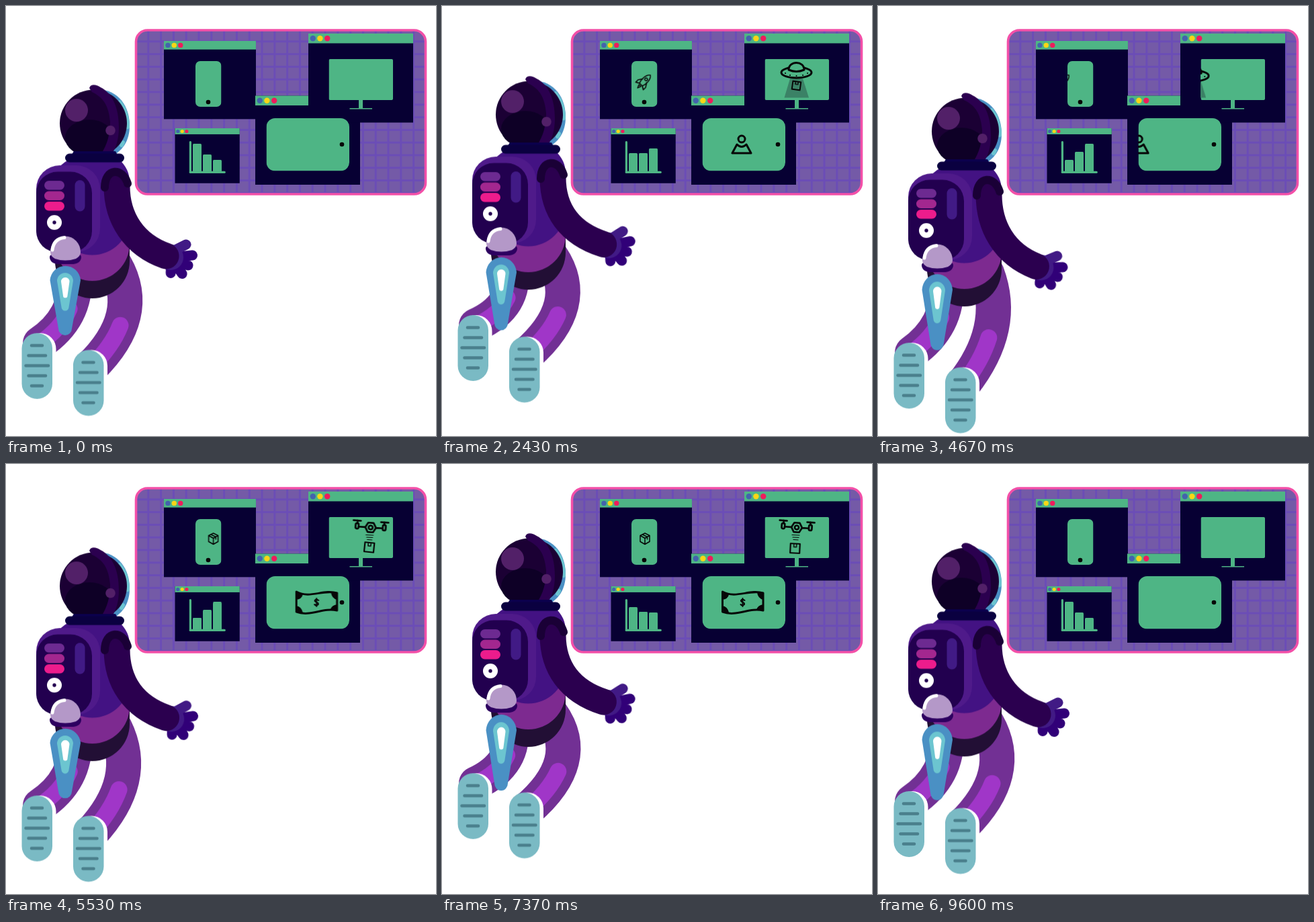
An HTML page without scripts for the animation above (9.63 s loop, 640 px wide and 640 px high).

```html
<!DOCTYPE html>
<html lang="en">
<head>
<meta charset="utf-8">
<title>Astronaut at a floating screen</title>
<style>
html, body { margin: 0; height: 100%; overflow: hidden; background: #fff; }
svg { display: block; width: 100vw; height: 100vh; }
.line { fill: none; stroke: #070707; stroke-width: 3; stroke-linecap: round; stroke-linejoin: round; }
.thin { stroke-width: 1.5; }
.green { fill: #4eb585; }

/* Floating figure: every part starts at its resting extreme */
.body, .rleg, .lleg, .rfoot, .lfoot, .arm, .hand {
  animation: 9.63s cubic-bezier(.37,0,.63,1) -.23s infinite;
}
.body { animation-name: float; }
.rleg { animation-name: rleg; }
.lleg { animation-name: lleg; }
.rfoot { animation-name: rfoot; }
.lfoot { animation-name: lfoot; }
.arm { animation-name: arm; }
.hand { animation-name: hand; transform-origin: 200px 340px; }
@keyframes float {
  0%, 100% { transform: translateY(.5px); }
  24.7% { transform: translateY(-13.5px); }
  52.2% { transform: translateY(12.3px); }
  78.2% { transform: translateY(-14px); }
}
@keyframes rfoot {
  0%, 100% { transform: translateY(.5px); }
  23.2% { transform: translateY(-8px); }
  50.2% { transform: translateY(14.2px); }
  73% { transform: translateY(-9.8px); }
}
@keyframes rleg {
  0%, 100% { d: path("M162 385Q205 460 126 538"); }
  23.2% { d: path("M162 385Q212 456 126 530"); }
  50.2% { d: path("M162 385Q193 467 126 552"); }
  73% { d: path("M162 385Q213 455 126 528"); }
}
@keyframes lfoot {
  0%, 100% { transform: translateY(0); }
  23.2% { transform: translateY(-15px); }
  54% { transform: translateY(2.5px); }
  74% { transform: translateY(-14px); }
}
@keyframes lleg {
  0%, 100% { d: path("M103 400Q106 464 50 502"); }
  23.2% { d: path("M103 400Q114 459 50 487"); }
  54% { d: path("M103 400Q105 465 50 504"); }
  74% { d: path("M103 400Q113 460 50 488"); }
}
@keyframes arm {
  0%, 100% { d: path("M165 268C165 315 190 355 238 372"); }
  24.2% { d: path("M165 268C165 317 190 351 241 367"); }
  47% { d: path("M165 268C165 315 187 357 235 376"); }
  69.9% { d: path("M165 268C165 317 190 351 241 367"); }
}
@keyframes hand {
  0%, 100% { transform: rotate(0); }
  24.2% { transform: rotate(-6.5deg); }
  47% { transform: rotate(5deg); }
  69.9% { transform: rotate(-7deg); }
}
.flame { transform-origin: 88px 385px; animation: flame 9.63s ease-in-out infinite; }
@keyframes flame {
  0%, 16%, 42%, 56%, 87.5%, 100% { transform: scaleY(1); }
  8%, 30%, 48.5%, 76%, 99.7% { transform: scaleY(1.096); }
  25.2% { transform: scaleY(1.05); }
  35.6%, 65% { transform: scaleY(1.06); }
}

/* Screen icons: two sets take turns, half a loop apart */
.slide { --k: 1; animation: slide 9.63s linear infinite; }
.second { animation-delay: -4.815s; }
.small { --k: .45; }
@keyframes slide {
  0% { transform: translateX(calc(var(--k) * 100px)); animation-timing-function: ease-out; }
  9.5% { transform: translateX(calc(var(--k) * 8px)); }
  15% { transform: translateX(calc(var(--k) * 6px)); animation-timing-function: ease-out; }
  24%, 36% { transform: translateX(0); animation-timing-function: ease-in-out; }
  43.2% { transform: translateX(calc(var(--k) * 17px)); animation-timing-function: cubic-bezier(.55,0,1,.85); }
  49.5%, 100% { transform: translateX(calc(var(--k) * -100px)); }
}
.sink { animation: sink 9.63s ease-in-out infinite; }
@keyframes sink {
  0%, 25.2% { transform: translateY(0); }
  35.6% { transform: translateY(3px); }
  48%, 100% { transform: translateY(5px); }
}
.lift { animation: lift 9.63s ease-in-out infinite; }
@keyframes lift {
  0%, 25.2% { transform: translate(527.5px, 118.5px) rotate(8deg); }
  35.6%, 100% { transform: translate(527px, 119.5px) rotate(0); }
}
.drop { animation: drop 9.63s ease-in-out infinite; }
@keyframes drop {
  0%, 65% { transform: translate(526px, 124px) rotate(6deg); }
  87.5%, 100% { transform: translate(525px, 127px) rotate(0); }
}

.bar { animation: 9.63s cubic-bezier(.7,0,.25,1) infinite; }
.b1 { animation-name: b1; }
.b2 { animation-name: b2; }
.b3 { animation-name: b3; }
@keyframes b1 { 50% { transform: translateY(24px); } }
@keyframes b2 { 50% { transform: translateY(-4px); } }
@keyframes b3 {
  0% { animation-timing-function: cubic-bezier(.6,0,.2,1); }
  50% { transform: translateY(-24px); }
}
</style>
</head>
<body>
<svg viewBox="0 0 640 640">
  <defs>
    <pattern id="grid" x="194.5" y="35.5" width="18.8" height="18.8" patternUnits="userSpaceOnUse">
      <path d="M18.8 0V18.8M0 18.8H18.8" fill="none" stroke="#6b4db6" stroke-width="6"/>
    </pattern>
    <clipPath id="phone"><rect x="282" y="82" width="38.5" height="68" rx="7"/></clipPath>
    <clipPath id="tablet"><rect x="387.5" y="167" width="123.5" height="78.5" rx="13"/></clipPath>
    <clipPath id="monitor"><rect x="480.5" y="79" width="95.5" height="61" rx="2"/></clipPath>
    <clipPath id="plot"><rect x="272" y="195" width="56" height="51"/></clipPath>
    <g id="win">
      <rect width="156" height="132.5" fill="#070033"/>
      <rect width="156" height="14.5" class="green"/>
      <circle cx="6.8" cy="7.3" r="4.2" fill="#4363ad"/>
      <circle cx="17.4" cy="7.3" r="4.2" fill="#f9d616"/>
      <circle cx="28.2" cy="7.3" r="4.2" fill="#ee1c5c"/>
    </g>
    <g id="boot">
      <rect x="4" width="47" height="98" rx="23.5" fill="#fff"/>
      <rect width="45.5" height="98" rx="22.75" fill="#7abac4"/>
      <path d="M14.5 18.5H30.5M10 33.5H35.5M6 48.5H39.5M10 63.5H35.5M14.5 78.5H30.5" stroke="#4a7f8c" stroke-width="4.6" stroke-linecap="round"/>
    </g>
  </defs>

  <!-- Screen -->
  <rect x="193.5" y="36" width="431" height="244" rx="17" fill="#745aa7"/>
  <rect x="193.5" y="36" width="431" height="244" rx="17" fill="url(#grid)" stroke="#f350a8" stroke-width="3.6"/>
  <use href="#win" transform="translate(235 52) scale(.878)"/>
  <use href="#win" transform="translate(251.5 182) scale(.617)"/>
  <use href="#win" x="371" y="133.5"/>
  <use href="#win" x="450" y="41"/>

  <!-- Phone -->
  <g clip-path="url(#phone)">
    <rect x="282" y="82" width="38.5" height="68" class="green"/>
    <circle cx="301" cy="143" r="3.3" fill="#070707"/>
    <g class="slide small">
      <g class="line thin" transform="translate(301 112) rotate(45)">
        <path d="M0-13C6-8 5 2 3 7H-3C-5 2-6-8 0-13Z"/>
        <path d="M-4-1L-8 5V10L-3 7M4-1L8 5V10L3 7M-2 9L0 14L2 9Z"/>
        <circle cy="-4" r="2"/>
      </g>
    </g>
    <g class="slide small second">
      <path class="line thin" d="M302 103L309 106.500V115.500L302 119.500L295 115.500V106.500ZL302 103M295 106.500L302 110.500L309 106.500M302 110.500V119.500M298.500 105L305.500 108.500V112"/>
    </g>
  </g>

  <!-- Tablet -->
  <g clip-path="url(#tablet)">
    <rect x="387.500" y="167" width="123.500" height="78.500" class="green"/>
    <circle cx="500" cy="206" r="3.300" fill="#070707"/>
    <g class="slide">
      <circle class="line" cx="446" cy="198" r="5"/>
      <path class="line" d="M439 206L432 219H460L453 206Q446 213 439 206Z"/>
    </g>
    <g class="slide second">
      <path class="line" d="M417.500 190C438 201 457 186 478 192V218C457 213 438 228 417.500 220Z"/>
      <path d="M417 190L427 194Q426 201 417 202ZM478 191L469 191Q470 200 478 202ZM417 221V211Q425 212 427 221ZM478 219V209Q470 210 468 217Z" fill="#070707"/>
      <path class="line" d="M450.500 203Q447 200 445 203C444 206 451 205 450 209Q447 212 444.500 209M447.500 200V212" style="stroke-width:2"/>
    </g>
  </g>

  <!-- Monitor -->
  <path class="green" d="M525 139H531V152H545V153.500H511.500V152H525Z"/>
  <g clip-path="url(#monitor)">
    <rect x="480.500" y="79" width="95.500" height="61" class="green"/>
    <g class="slide">
      <path d="M518 108H537L546 136.500H509.500Z" fill="#3b8266"/>
      <g class="lift">
        <rect class="line" x="-6" y="-6" width="12" height="12" style="stroke-width:2"/>
        <path class="line thin" d="M-2-5V-2H2V-5"/>
      </g>
      <g class="sink">
        <ellipse class="line" cx="527.500" cy="99" rx="22.500" ry="8" style="fill:#4eb585"/>
        <path class="line" d="M516 95C516 81 539 81 539 95Q527.500 100 516 95Z" style="fill:#4eb585"/>
        <path class="line" d="M511 100h.1M518 103h.1M527.500 104h.1M537 103h.1M544 100h.1" style="stroke-width:2"/>
      </g>
    </g>
    <g class="slide second">
      <g class="line" transform="translate(528 94.500) rotate(4)" style="stroke-width:2.700">
        <path d="M-8 0L-4-7H4L8 0L4 7H-4ZM-8 0H-18M8 0H18M-26-9H-15M15-9H26M-20-9V-5M20-9V-5"/>
        <rect x="-22.500" y="-5" width="4.500" height="8" rx="2"/>
        <rect x="18" y="-5" width="4.500" height="8" rx="2"/>
        <circle r="3"/>
      </g>
      <path class="line thin" d="M521 105.500L532 106M522 109L531 109.500M523 112.500L530 113" style="stroke-width:1.200"/>
      <g class="drop">
        <rect class="line" x="-7" y="-7" width="14" height="14" style="stroke-width:2.200"/>
        <path class="line thin" d="M-2-6V-2H2V-6"/>
      </g>
    </g>
  </g>

  <!-- Chart -->
  <g class="green">
    <g clip-path="url(#plot)">
      <rect class="bar b1" x="278" y="205" width="13" height="60" rx="1.500"/>
      <rect class="bar b2" x="293" y="221" width="13" height="60" rx="1.500"/>
      <rect class="bar b3" x="308" y="229" width="13" height="60" rx="1.500"/>
    </g>
    <rect x="272.800" y="201" width="3.200" height="48" rx="1.600"/>
    <rect x="272.800" y="245.700" width="54" height="3.300" rx="1.600"/>
  </g>

  <!-- Astronaut -->
  <g class="body">
    <g fill="none" stroke="#723094" stroke-linecap="round">
      <path class="lleg" d="M103 400Q106 464 50 502" stroke-width="50"/>
      <path class="rleg" d="M162 385Q205 460 126 538" stroke-width="52"/>
      <g stroke="#a036c8">
        <path class="lleg" d="M103 400Q106 464 50 502" pathLength="100" stroke-dasharray="60 100" stroke-dashoffset="-43" stroke-width="24"/>
        <path class="rleg" d="M162 385Q205 460 126 538" pathLength="100" stroke-dasharray="60 100" stroke-dashoffset="-55" stroke-width="25"/>
      </g>
    </g>
    <g class="lfoot"><use href="#boot" x="23.500" y="487"/></g>
    <g class="rfoot"><use href="#boot" x="100" y="511.500"/></g>

    <path d="M73 340H184V379.500A55.500 55.500 0 0 1 73 379.500Z" fill="#220f35"/>
    <path d="M73 310H184V353.500A55.500 55.500 0 0 1 73 353.500Z" fill="#7d2a90"/>
    <path d="M73 315V250Q78 236 95 228H168Q184 242 184 262V315A55.500 55.500 0 0 1 73 315Z" fill="#431283"/>

    <!-- Helmet -->
    <path d="M136 124C168 124 184 150 184 178C184 200 174 214 160 222H136Z" fill="#4a90c4"/>
    <path d="M169 143Q181 158 181 180M172 207L174 203" fill="none" stroke="#6cc5d0" stroke-width="6" stroke-linecap="round"/>
    <circle cx="130" cy="174.500" r="50" fill="#1b0034"/>
    <ellipse cx="124" cy="196" rx="36" ry="27" fill="#0e0026"/>
    <path d="M124 122C126 115 135 117 141 121C159 130 168 152 168 180C168 200 163 212 157 221L141 221C151 206 155 190 155 172C153 150 146 136 128 128Z" fill="#2b004f"/>
    <circle cx="105" cy="155" r="17" fill="#522068"/>
    <circle cx="155.500" cy="185" r="7.300" fill="#522068"/>
    <path d="M97 222L101 216H163L166 222Z" fill="#0b004d"/>
    <rect x="88" y="219.500" width="88" height="13" rx="6.500" fill="#0a0040"/>

    <!-- Backpack -->
    <rect x="45" y="237" width="95" height="129" rx="35" fill="#4f1a8a"/>
    <rect x="45" y="246.500" width="83" height="120" rx="32" fill="#22004f"/>
    <rect x="57" y="260" width="30" height="13.500" rx="6.700" fill="#6d2a91"/>
    <rect x="57" y="275.500" width="30" height="13.500" rx="6.700" fill="#a3278f"/>
    <rect x="57" y="291" width="30" height="13.500" rx="6.700" fill="#ed1c8c"/>
    <rect x="102.500" y="259" width="15" height="46.500" rx="7.500" fill="#411a85"/>
    <circle cx="72" cy="322" r="11" fill="#fff"/>
    <circle cx="72" cy="322" r="2.700" fill="#22004f"/>

    <!-- Thruster -->
    <g class="flame">
      <path d="M65.500 408A22.800 22.800 0 0 1 111 408L98 480A10 10 0 0 1 78 480Z" fill="#4a90c4"/>
      <path d="M76 409A12 12 0 0 1 100 409L93.500 448A5.500 5.500 0 0 1 82.500 448Z" fill="#6cc5d0"/>
      <path d="M82 410A6.200 6.200 0 0 1 94.500 410L91.500 431A3.200 3.200 0 0 1 85 431Z" fill="#fff"/>
    </g>
    <path d="M69 374Q70 380 80 380H97Q107 380 108 374" fill="none" stroke="#2d0060" stroke-width="8" stroke-linecap="round"/>
    <path d="M66 366A22.500 23.500 0 0 1 111 366Q111 372 104 376Q88 381 73 376Q66 372 66 366Z" fill="#b498c8"/>
    <path d="M69 363Q71 346 87 344.500" fill="none" stroke="#fff" stroke-width="5" stroke-linecap="round"/>

    <!-- Arm -->
    <g class="hand" fill="none" stroke="#310078" stroke-width="15" stroke-linecap="round">
      <path d="M250 374L277.500 371M250 376L271 386M248 378L262 398.500M246 378L245 397.500"/>
      <path d="M248 365L268 355" stroke="#411a85"/>
      <circle cx="245" cy="374" r="19" fill="#411a85" stroke="none"/>
    </g>
    <path class="arm" d="M165 268C165 315 190 355 238 372" fill="none" stroke="#2b004f" stroke-width="39" stroke-linecap="round"/>
    <path d="M147 270C147 240 174 240 181 264" fill="none" stroke="#1a0036" stroke-width="12" stroke-linecap="round"/>
    <path d="M153 278V268Q156 256 165 256Q174 258 176 268V278Z" fill="#2b004f"/>
  </g>
</svg>
</body>
</html>
```
